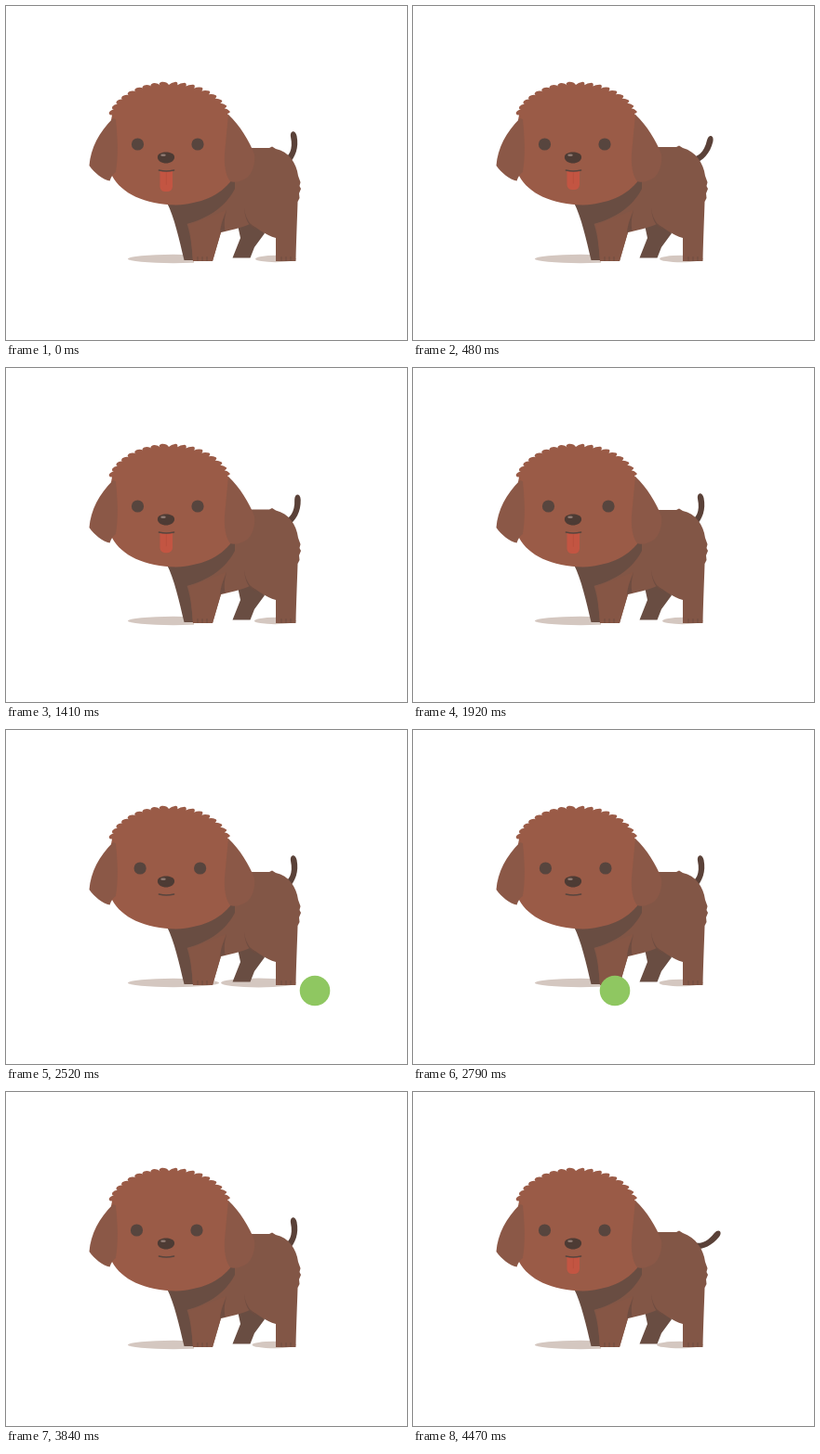
Recreate the animation shown at these times as an HTML page with a canvas. Size 431x360 px, loop 4.5 s.

```html
<!DOCTYPE html>
<html lang="en">
<head>
<meta charset="utf-8">
<title>Puppy and ball</title>
<style>
html, body { margin: 0; width: 100%; height: 100%; overflow: hidden; background: #fff; }
canvas { display: block; }
</style>
</head>
<body>
<canvas id="stage" width="431" height="360"></canvas>
<script>
const ctx = document.getElementById('stage').getContext('2d');
const LOOP = 4500, WAG = 274, WAG_END = WAG * 6, WAG_RESTART = 4335;
const color = {
  head: '#9a5b47', ear: '#8b5847', body: '#825646', leg: '#865645',
  dark: '#694d42', crease: '#6f4d41', tail: '#5a4138', eye: '#57453e',
  nose: '#4d3b34', tongue: '#c35542', shadow: '#d4c7c0', ball: '#8fc761'
};

const clamp = v => Math.max(0, Math.min(1, v));
const ease = v => v * v * (3 - 2 * v);
const ramp = (t, from, to) => ease(clamp((t - from) / (to - from)));

function fill(path, paint) {
  ctx.fillStyle = paint;
  ctx.fill(typeof path === 'string' ? new Path2D(path) : path);
}

function line(path, paint, width) {
  ctx.strokeStyle = paint;
  ctx.lineWidth = width;
  ctx.lineCap = 'round';
  ctx.stroke(new Path2D(path));
}

function oval(x, y, rx, ry, paint) {
  ctx.fillStyle = paint;
  ctx.beginPath();
  ctx.ellipse(x, y, rx, ry, 0, 0, Math.PI * 2);
  ctx.fill();
}

// Face outline with a row of leaning curls along the crown
function makeHead() {
  const path = new Path2D();
  const curls = 18, start = Math.PI * 1.08, span = Math.PI * 0.83, step = span / curls;
  const at = (a, r) => [176 + (64 + r) * Math.cos(a), 128 + (42.5 + r) * Math.sin(a)];
  path.moveTo(114, 183);
  path.lineTo(113, 123);
  path.lineTo(...at(start, 0));
  for (let i = 0; i < curls; i++) {
    const a = start + step * i, lean = i < curls / 2 ? -0.25 : 0.25;
    path.quadraticCurveTo(...at(a + step * lean, 3), ...at(a + step * (0.5 + lean), 4));
    path.quadraticCurveTo(...at(a + step * (0.9 + lean / 2), 4), ...at(a + step, 0.5));
  }
  path.lineTo(241, 120);
  path.lineTo(243, 187);
  path.bezierCurveTo(230, 205, 209, 213, 183, 214.5);
  path.bezierCurveTo(149, 214, 124, 202, 114, 183);
  path.closePath();
  return path;
}
const head = makeHead();

function wagAt(t) {
  if (t < WAG_END) return (1 - Math.cos(t / WAG * Math.PI * 2)) / 2;
  if (t > WAG_RESTART) return (1 - Math.cos((t - WAG_RESTART) / WAG * Math.PI * 2)) / 2;
  return 0;
}

function gazeAt(t) {
  if (t < 2300) return 4 * ramp(t, 1650, 1860);
  if (t < 3800) return 4 - 5 * clamp((t - 2300) / 800);
  return -1 + ramp(t, 3840, 4200);
}

function drawShadows(t, wag) {
  const wide = t > 2340 && t < 2790;
  const hindLeft = wide ? 231 : t < 2340 ? 268 - 6 * wag : 264.5 - 2.5 * wag;
  ctx.save();
  ctx.beginPath();
  ctx.rect(130, 260, wide ? 100 : 72, 30);
  ctx.clip();
  oval(180, 272.5, 49, 4.7, color.shadow);
  ctx.restore();
  oval((hindLeft + 312) / 2, 272.5, (312 - hindLeft) / 2, wide ? 5 : 3.7, color.shadow);
}

function drawTail(wag) {
  ctx.save();
  ctx.translate(303, 166);
  ctx.rotate(wag * 0.86);
  fill('M-5 -1C1 -4 6 -11 3 -25C2 -32 8 -33 9.500 -26C12 -13 8 -3 1 4Z', color.tail);
  ctx.restore();
}

function drawBody(wag) {
  const top = 153 - 2 * wag;
  fill('M173 212C181 228 186 251 191.500 274L202 274L202 225Z', color.dark);
  fill('M249 236L252 250L243.500 271.500L262.500 271.500L267 260L278 245L270 230Z', color.dark);
  fill(`M185 212L240 150L262 ${top}L283 ${top}L286 ${top - 1.5}L290 ${top + 1}C304 157 312 169 314 183
    L316.500 190L315.500 194L317 197L315 202L315.500 207L313.500 211C313 229 312 250 311.500 275
    L290 275L290 250C279 247 270 239 262 235C254 239 240 242 231 244
    L222 275L201 275C200 263 199 249 195 236Z`, color.body);
  fill('M197 236L236 220C234 230 231 238 231 244L222 275L201 275C200 263 199 250 197 236Z', color.leg);
  fill('M237 220C234 228 231 234 230 244L235.500 242C234 234 235 228 237 220Z', color.crease);
  fill('M256 218C257 229 260 238 270 241L262 234C259 230 257 225 256 218Z', color.crease);
  fill('M174 213C179 223 185 231 190 236C212 231 235 219 246 197L246 184L211 208Z', color.dark);
  for (const x of [206, 211, 216, 296, 301, 306]) line(`M${x} 270.500V274.500`, color.crease, 1);
}

function drawHead(t, wag) {
  const gaze = gazeAt(t);
  fill(head, color.head);
  fill('M115 121C100 136 91 153 89.500 172C95 180 104 187 111.500 188.500C113 184 115 181 118 179C121 161 120 142 118 122Z', color.ear);
  fill('M239 117C251 128 262 146 267 160C268 170 265 180 259 185C253 189 245 191 241 189C234 181 234 163 236 149C237 137 238 127 239 117Z', color.ear);
  oval(141.5 + gaze, 149, 6.6, 6.6, color.eye);
  oval(206 + gaze, 149, 6.6, 6.6, color.eye);

  const out = t < 3000 ? 1 - ramp(t, 2220, 2340) : ramp(t, 4335, 4450);
  const length = (22 - 4 * wag) * out;
  if (length > 0.5) {
    const r = Math.min(5.5, length / 2);
    const tongue = new Path2D();
    tongue.roundRect(165.5, 178, 13.5, length, [0, 0, r, r]);
    fill(tongue, color.tongue);
    line(`M172.300 180V${178 + length * .65}`, '#b94f3e', 1);
  }
  line('M164.500 177Q172 179 180.500 177', color.eye, 1.7);
  fill('M163 162C164 156 180 156 181 162C182 167 176 169.500 172 169.500C168 169.500 162 167 163 162Z', color.nose);
  oval(169, 160.7, 2.8, 1.2, '#8f7a72');
}

function drawBall(t) {
  const x = 332 - (t - 2520) * 230 / 540;
  if (x <= 404 && x >= 101) oval(x, 281, 16.3, 16.3, color.ball);
}

function render(t) {
  const wag = wagAt(t);
  ctx.fillStyle = '#fff';
  ctx.fillRect(0, 0, 431, 360);
  drawShadows(t, wag);
  drawTail(wag);
  drawBody(wag);
  drawHead(t, wag);
  drawBall(t);
}

const began = performance.now();
function tick() {
  const t = (performance.now() - began) % LOOP;
  render(Math.floor(t / 30) * 30);
  requestAnimationFrame(tick);
}
tick();
</script>
</body>
</html>
```
